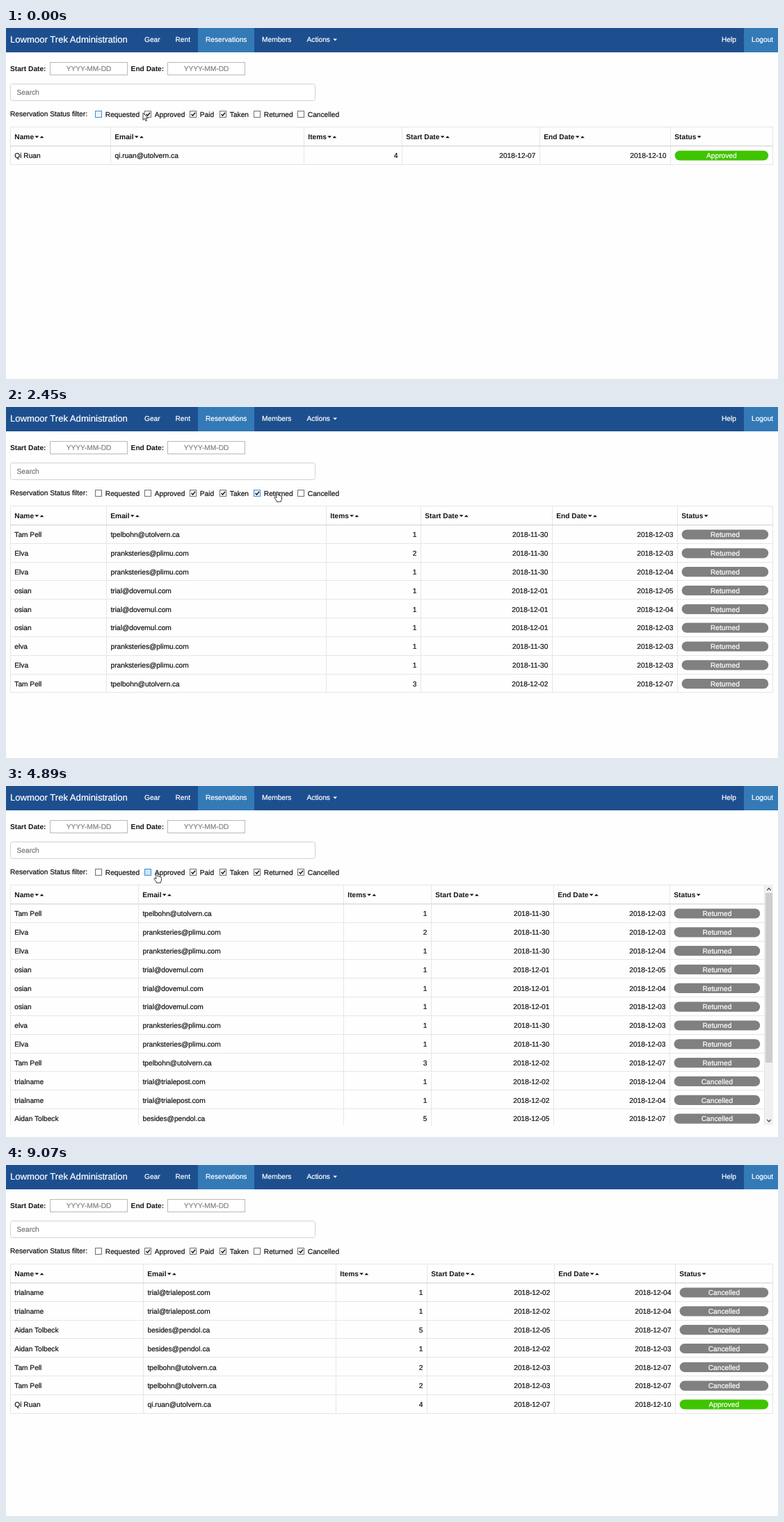
An HTML page that plays this animation: 1110x505 px, repeating every 9.19 s.

```html
<!DOCTYPE html>
<html lang="en">
<head>
<meta charset="utf-8">
<title>Reservations</title>
<style>
  html, body { margin: 0; width: 100%; height: 100%; overflow: hidden; background: #fefefe; }
  svg { display: block; width: 1110px; height: 505px; }
  text { font: 10.2px "Liberation Sans", Arial, sans-serif; text-rendering: geometricPrecision; white-space: pre; stroke-width: .22px; }
  .b { font-weight: bold; stroke-width: 0; }
  .line { shape-rendering: crispEdges; }
</style>
</head>
<body>
<svg id="stage" viewBox="0 0 1110 505">
  <g id="page"></g>
  <g id="table"></g>
  <g id="filters"></g>
  <g id="pointer"></g>
</svg>
<script>
const LOOP = 9190, STEP = 120;
const ROW = 26.83, HEAD_TOP = 142, HEAD_LINE = 169, TABLE_END = 488;
const INK = '#141414';

const filters = [
  ['Requested', 128, 192], ['Approved', 199, 258], ['Paid', 264, 300],
  ['Taken', 307, 349], ['Returned', 356, 413], ['Cancelled', 419, 480]
].map(([name, x, end]) => ({ name, x, end }));
const initiallyOn = ['Approved', 'Paid', 'Taken'];

// press time, release time, filter index
const clicks = [[1590, 1840, 1], [2330, 2450, 4], [3430, 3550, 5], [4890, 5010, 1], [5490, 5740, 4]];

// first move, number of moves, destination
const legs = [
  [120, 2, 214, 125], [490, 4, 278, 118], [1100, 1, 279.5, 118.5], [1470, 2, 208, 120],
  [1960, 2, 385, 121], [2330, 2, 390, 122], [2700, 3, 477, 124], [3060, 1, 466, 126],
  [3920, 7, 217, 125], [5130, 4, 403, 124], [5860, 2, 450, 123], [6730, 3, 330, 122],
  [7220, 7, 1084, 492], [8060, 1, 1200, 540]
];

const people = {
  tam: ['Tam Pell', 'tpelbohn@utolvern.ca'],
  Elva: ['Elva', 'pranksteries@plimu.com'],
  elva: ['elva', 'pranksteries@plimu.com'],
  osian: ['osian', 'trial@dovemul.com'],
  trial: ['trialname', 'trial@trialepost.com'],
  aidan: ['Aidan Tolbeck', 'besides@pendol.ca'],
  qi: ['Qi Ruan', 'qi.ruan@utolvern.ca']
};
const bookings = [
  ['tam', 1, '11-30', '12-03', 'Returned'],
  ['Elva', 2, '11-30', '12-03', 'Returned'],
  ['Elva', 1, '11-30', '12-04', 'Returned'],
  ['osian', 1, '12-01', '12-05', 'Returned'],
  ['osian', 1, '12-01', '12-04', 'Returned'],
  ['osian', 1, '12-01', '12-03', 'Returned'],
  ['elva', 1, '11-30', '12-03', 'Returned'],
  ['Elva', 1, '11-30', '12-03', 'Returned'],
  ['tam', 3, '12-02', '12-07', 'Returned'],
  ['trial', 1, '12-02', '12-04', 'Cancelled'],
  ['trial', 1, '12-02', '12-04', 'Cancelled'],
  ['aidan', 5, '12-05', '12-07', 'Cancelled'],
  ['aidan', 1, '12-02', '12-03', 'Cancelled'],
  ['tam', 2, '12-03', '12-07', 'Cancelled'],
  ['tam', 2, '12-03', '12-07', 'Cancelled'],
  ['qi', 4, '12-07', '12-10', 'Approved']
];

// column edges by number of visible rows
const wide = [6, 190, 485, 611, 787, 954, 1090];
const layouts = {
  0: [6, 172, 338, 501, 730, 947, 1102],
  1: [6, 150, 428, 569, 767, 955, 1102],
  7: [6, 197, 474, 605, 788, 962, 1102],
  9: [6, 144, 460, 596, 785, 965, 1102],
  15: wide, 16: wide
};

const rect = (x, y, w, h, fill, extra = '') =>
  `<rect x="${x}" y="${y}" width="${w}" height="${h}" fill="${fill}" ${extra}/>`;
const line = (x, y, w, h, fill = '#e6e6e6') => rect(x, y, w, h, fill, 'class="line"');
const text = (x, y, s, fill = INK, extra = '') =>
  `<text x="${x}" y="${y}" fill="${fill}" stroke="${fill}" ${extra}>${s}</text>`;
const path = (d, extra) => `<path d="${d}" ${extra}/>`;
const caret = (x, y, up, fill = INK) =>
  path(up ? `M${x} ${y + 3}h5.8l-2.9 -3z` : `M${x} ${y}h5.8l-2.9 3z`, `fill="${fill}"`);

const ruler = document.createElement('canvas').getContext('2d');
ruler.font = 'bold 102px "Liberation Sans", Arial, sans-serif';
const boldWidth = s => ruler.measureText(s).width / 10;

function drawPage() {
  const nav = [['Gear', 199], ['Rent', 243.5], ['Reservations', 287], ['Members', 368], ['Actions', 432.5], ['Help', 1029], ['Logout', 1072]];
  const dateBox = x => rect(x + .5, 49.5, 111, 18, '#fff', 'stroke="#b9b9b9"') +
    text(x + 56, 62, 'YYYY-MM-DD', '#858585', 'text-anchor="middle"');
  return rect(0, 0, 1110, 35, '#1d4f8f') +
    line(276, 0, 81, 35, '#337ab7') + line(1061, 0, 49, 35, '#337ab7') +
    text(6, 20.7, 'Lowmoor Trek Administration', '#fff', 'style="font-size:13.1px"') +
    nav.map(([s, x]) => text(x, 20, s, '#fff')).join('') + caret(470.3, 15.6, false, '#fff') +
    text(6, 62, 'Start Date:', INK, 'class="b"') + dateBox(63) +
    text(179.6, 62, 'End Date:', INK, 'class="b"') + dateBox(232) +
    rect(6.5, 80.5, 438, 24, '#fff', 'rx="3" stroke="#d2d2d2"') + text(15.5, 96.3, 'Search', '#777') +
    text(6, 126.7, 'Reservation Status filter:');
}

function drawHeader(edges) {
  return ['Name', 'Email', 'Items', 'Start Date', 'End Date', 'Status'].map((s, i) => {
    const x = edges[i] + 6.3, end = x + boldWidth(s);
    return text(x, 160, s, INK, 'class="b"') + caret(end + 1.3, 155.3, false) +
      (i < 5 ? caret(end + 8.5, 155.3, true) : '');
  }).join('');
}

function drawRow([who, items, from, to, status], i, edges) {
  const y = 187.2 + i * ROW, [name, email] = people[who];
  const right = (col, s) => text(edges[col] - 5.6, y, s, INK, 'text-anchor="end"');
  const left = edges[5] + 6.6, width = edges[6] - 5.8 - left;
  return text(12.3, y, name) + text(edges[1] + 6.5, y, email) +
    right(3, items) + right(4, '2018-' + from) + right(5, '2018-' + to) +
    rect(left, y - 10.8, width, 14.2, status === 'Approved' ? '#3fc400' : '#808080', 'rx="7.1"') +
    text(left + width / 2, y, status, '#fff', 'text-anchor="middle"') +
    line(6, Math.floor(169.4 + (i + 1) * ROW), edges[6] - 5, 1);
}

function drawScrollbar(count) {
  const thumb = 322 * 346 / (54 + count * ROW);
  const chevron = (y, d) => path(`M1094.3 ${y}l2.7 ${d}l2.7 ${-d}`, 'fill="none" stroke="#505050" stroke-width="1.3"');
  return line(1091, HEAD_TOP, 12, TABLE_END - HEAD_TOP, '#f0f0f0') +
    line(1092, 154, 10, Math.round(thumb), '#cdcdcd') + chevron(150, -3) + chevron(480, 3);
}

function drawTable(rows) {
  const count = rows.length, edges = layouts[count];
  const bottom = Math.min(TABLE_END, Math.floor(170.4 + count * ROW));
  const width = edges[6] - 5;
  const clip = `style="clip-path:polygon(0 0,1110px 0,1110px ${TABLE_END}px,0 ${TABLE_END}px)"`;
  return `<g ${clip}>` + rect(0, 0, 1110, 505, 'none') +
    line(6, HEAD_TOP, width, 1) +
    edges.map(x => line(x, HEAD_TOP, 1, bottom - HEAD_TOP)).join('') +
    rect(6, HEAD_LINE, width, 1.4, '#dadada') +
    drawHeader(edges) + rows.map((r, i) => drawRow(r, i, edges)).join('') + '</g>' +
    (count > 12 ? drawScrollbar(count) : '');
}

function drawFilter(f, on, hover, pressed, fading) {
  const fill = pressed ? '#cce4f7' : hover || fading ? '#eef6fd' : '#fff';
  return rect(f.x + .5, 119.5, 9, 9, fill, `stroke="${hover || pressed ? '#3a8ddd' : '#707070'}"`) +
    (on ? path(`M${f.x + 2.5} 124l2 2.1l3.5 -4.4`, `fill="none" stroke="${INK}" stroke-width="1.5"`) : '') +
    text(f.x + 14.8, 127.8, f.name);
}

function drawPointer(x, y, hand) {
  const shape = hand
    ? 'M-1.2 7V1.2Q-1.2 0 0 0T1.2 1.2V5Q2.3 4.3 3.2 5.4Q4.3 4.9 5 6Q6.5 5.6 6.5 7.4V10Q6.5 11.5 5.4 13V14.3H-.8V13L-3.8 9.2Q-4.5 8 -3.6 7.5Q-2.6 7 -1.2 9Z'
    : 'M0 0V10.4L2.4 8.2L4 11.8L5.6 11.1L4 7.6H7.3Z';
  return path(shape, `transform="translate(${x} ${y})" fill="#fff" stroke="#222" stroke-width=".9" stroke-linejoin="round"`);
}

function pointerAt(t) {
  let x = 197, y = 122;
  for (const [start, moves, toX, toY] of legs) {
    if (t < start) break;
    const part = Math.min(1, (Math.floor((t - start) / STEP) + 1) / moves);
    x += (toX - x) * part;
    y += (toY - y) * part;
  }
  return { x, y };
}

const shown = {};
function show(id, markup) {
  if (shown[id] === markup) return;
  shown[id] = markup;
  document.getElementById(id).innerHTML = markup;
}

function render(t) {
  const { x, y } = pointerAt(t);
  const on = filters.map((f, i) =>
    clicks.reduce((state, [, release, k]) => k === i && t >= release ? !state : state, initiallyOn.includes(f.name)));
  const over = filters.findIndex(f => x >= f.x && x <= f.end && y > 116 && y < 132);
  const visible = bookings.filter(b => on[filters.findIndex(f => f.name === b[4])]);

  show('table', drawTable(visible));
  show('filters', filters.map((f, i) => {
    const pressed = clicks.some(([press, release, k]) => k === i && t >= press && t < release);
    const hover = i === over || (i === 0 && t < 120);
    const fading = i === 4 && t >= 6970 && t < 9070;
    return drawFilter(f, on[i], hover, pressed, fading);
  }).join(''));
  show('pointer', drawPointer(x, y, over >= 0));
}

show('page', drawPage());
const began = performance.now();
function tick() {
  render((performance.now() - began) % LOOP);
  requestAnimationFrame(tick);
}
tick();
</script>
</body>
</html>
```
